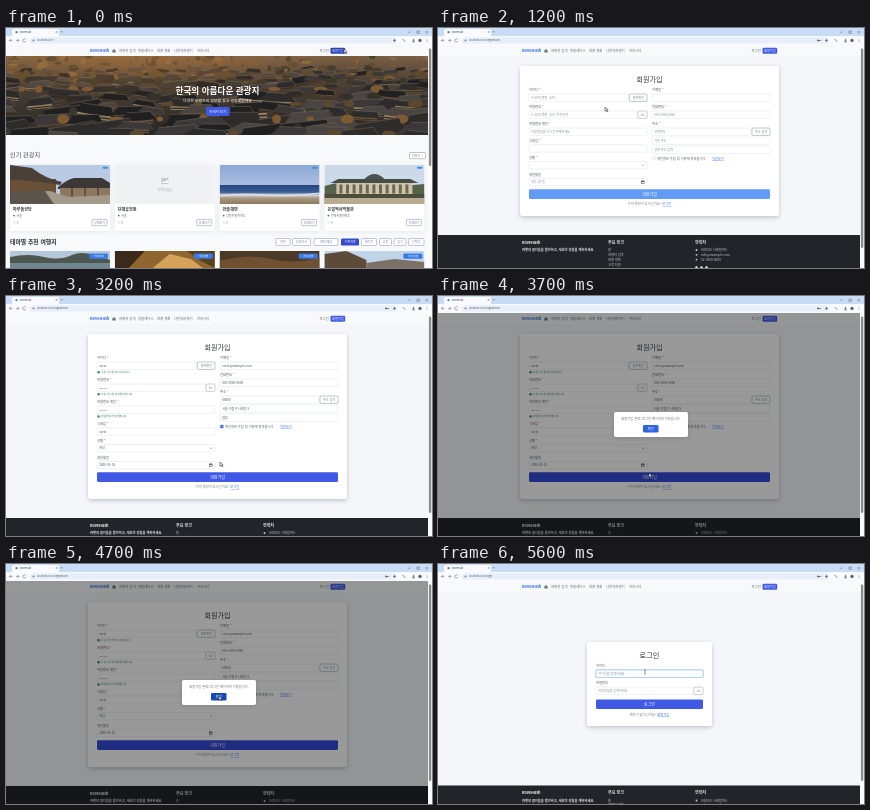
An HTML page that plays this animation: 426 px wide and 240 px high, repeating every 5.7 s.

```html
<!DOCTYPE html>
<html lang="ko">
<head>
<meta charset="utf-8">
<title>RoveHush</title>
<style>
html, body { margin: 0; width: 100%; height: 100%; overflow: hidden; background: #f4f6f9; }
svg { display: block; width: 100%; height: 100%; }
text { font-family: "Noto Sans CJK KR", "Noto Sans CJK", "Noto Sans", sans-serif; white-space: pre; }
</style>
</head>
<body>
<svg id="stage" viewBox="0 0 426 240"></svg>
<script>
const LOOP = 5700, STEP = 100;
const OPEN_REGISTER = 400, CHECK_ID = 1900, FILL_REST = 2000, AGREE = 3000;
const OPEN_MODAL = 3700, OPEN_LOGIN = 4800, FOCUS_LOGIN = 5500;
const BLUE = '#4059e5', LINK = '#3f74ea', INK = '#2c3036', MUTED = '#82878d', LINE = '#dfe3e7';
const stage = document.getElementById('stage');

const rect = (x, y, w, h, fill, extra = '') =>
  `<rect x="${x}" y="${y}" width="${w}" height="${h}" fill="${fill}" ${extra}/>`;
const path = (d, fill, extra = '') => `<path d="${d}" fill="${fill}" ${extra}/>`;
const stroke = (d, color, width = .6) => path(d, 'none', `stroke="${color}" stroke-width="${width}"`);
const dot = (x, y, r, fill) => `<circle cx="${x}" cy="${y}" r="${r}" fill="${fill}"/>`;
// y is the vertical middle of the line of text
const text = (x, y, str, size, fill = INK, extra = '') =>
  `<text x="${x}" y="${y + size * .36}" font-size="${size}" fill="${fill}" ${extra}>${str}</text>`;
const middle = (x, y, str, size, fill, bold) =>
  text(x, y, str, size, fill, `text-anchor="middle" font-weight="${bold ? 700 : 400}"`);
const bold = (x, y, str, size, fill) => text(x, y, str, size, fill, 'font-weight="700"');

function random(seed) {
  return () => (seed = seed * 16807 % 2147483647) / 2147483647;
}

function button(x, y, w, h, label, size, fill = BLUE, color = '#fff') {
  return rect(x, y, w, h, fill, 'rx="1.3"') + middle(x + w / 2, y + h / 2, label, size, color);
}

function outlined(x, y, w, h, label, size = 3, color = '#777d84') {
  return rect(x, y, w, h, '#fff', `rx="1" stroke="${color}" stroke-width=".45"`) +
    middle(x + w / 2, y + h / 2, label, size, color);
}

function card(x, y, w, h) {
  return rect(x, y + 1.5, w, h, '#9ba5b0', 'rx="3" filter="url(#blur)" opacity=".65"') +
    rect(x, y, w, h, '#fff', 'rx="2.5"');
}

function field(x, y, w, value, hint = '', focus = false, h = 7.4) {
  const ring = focus ? rect(x - .7, y - .7, w + 1.4, h + 1.4, '#c6dcfd', 'rx="1.6"') : '';
  return ring + rect(x, y, w, h, '#fff', `rx="1" stroke="${focus ? '#78aef8' : LINE}" stroke-width=".5"`) +
    text(x + 2.2, y + h / 2, value || hint, 3.1, value ? '#4b5157' : '#888d93');
}

const label = (x, y, str, required = true) =>
  text(x, y, str + (required ? ' <tspan fill="#dc3545">*</tspan>' : ''), 3.3, '#50555b');

const eye = (x, y) => rect(x, y, 9, 7.4, '#fff', 'rx="1" stroke="#92979c" stroke-width=".45"') +
  `<ellipse cx="${x + 4.5}" cy="${y + 3.7}" rx="1.5" ry=".9" fill="none" stroke="#777" stroke-width=".4"/>`;

const defs = `<defs>
  <filter id="blur" x="-10%" y="-10%" width="120%" height="125%"><feGaussianBlur stdDeviation="2"/></filter>
  <linearGradient id="town" x2="0" y2="1"><stop stop-color="#8f7050"/><stop offset=".3" stop-color="#5e4e3f"/>
    <stop offset="1" stop-color="#2f2d2c"/></linearGradient>
  <radialGradient id="sun" cx=".3" cy="0" r=".5"><stop stop-color="#d08a45" stop-opacity=".55"/>
    <stop offset="1" stop-color="#d08a45" stop-opacity="0"/></radialGradient>
  <linearGradient id="sea" x2="0" y2="1"><stop stop-color="#8ea9d6"/><stop offset=".5" stop-color="#a9bce0"/>
    <stop offset=".52" stop-color="#244682"/><stop offset=".7" stop-color="#3c5f96"/>
    <stop offset=".77" stop-color="#d5d9df"/><stop offset=".85" stop-color="#a8977f"/>
    <stop offset="1" stop-color="#8f7a62"/></linearGradient>
</defs>`;

function browser(page) {
  const route = { home: '', register: '/registeruser', login: '/login' }[page];
  let s = rect(0, 0, 426, 9, '#c9dcf5') + rect(0, 8, 426, 9, '#f8faff') +
    path('M6 8V2.5Q6 1 8 1H51Q53 1 53 2.5V8Z', '#f8faff') + dot(10.5, 4.2, 1.1, '#3974db') +
    text(14, 4.2, 'RoveHush', 2.4, '#333') + text(49, 4.2, '×', 3.2) + text(55, 4.2, '+', 3.5) +
    rect(24, 9.2, 367, 6.4, '#e9eff8', 'rx="3.2"') + dot(27.5, 12.4, .9, '#777') +
    text(31, 12.4, 'localhost:5173' + route, 2.45, '#454b54');
  s += stroke('M6.5 12.4H3.5l1.4-1.4M3.5 12.4l1.4 1.4M10 12.4h3l-1.4-1.4M13 12.4l-1.4 1.4M19.8 11.4a1.6 1.6 0 1 0 .1 1.8', '#555', .5);
  s += stroke('M402 4.2h2.5M411 3h2.4v2.4H411ZM419.5 3l2.4 2.4M421.9 3l-2.4 2.4', '#384454', .4);
  s += stroke('M387 12.4h3M388.5 11v3M396.5 11l2.8 2.8M406 13.8h3M407.5 10.7v2.3l-1-.8M407.5 13l1-.8', '#444', .6);
  s += dot(414, 12.4, 1.7, '#59626c') + [11, 12.4, 13.8].map(y => dot(421, y, .35, '#444')).join('');
  if (page !== 'home') s += dot(380, 12.4, .9, '#555') + rect(380, 12, 3, .7, '#555');
  return s;
}

function nav(hover) {
  const items = [[113, '여행지 검색'], [132, '핫플레이스'], [151, '여행 계획'], [168, '나만의여행기'], [191, '커뮤니티']];
  return rect(0, 17, 422, 11, '#f8f9fa') + bold(84, 22.7, 'RoveHush', 3.9, '#2f6ce0') +
    path('M106.3 22.5l1.7-1.6 1.7 1.6v2h-3.4Z', '#777') +
    items.map(([x, s]) => text(x, 22.7, s, 3.4, '#6b7075')).join('') +
    text(313.5, 22.7, '로그인', 3.4, '#6b7075') +
    button(324.5, 19.8, 14.7, 6, '회원가입', 3.2, hover ? '#263fb8' : BLUE);
}

const scrollbar = end => rect(422, 17, 4, 223, '#fbfbfb') +
  rect(422.9, 20.5, 2.4, end - 20.5, '#8b8b8b', 'rx="1.2"');

function footer(y) {
  const links = ['홈', '여행지 검색', '여행 계획', '고객 지원'];
  const contacts = ['(00000) 나래캠퍼스', 'info@example.com', '02-0000-0000'];
  return rect(0, y, 422, 240 - y, '#212529') + bold(84, y + 7.5, 'RoveHush', 3.7, '#fff') +
    bold(84, y + 15, '여행의 즐거움을 발견하고, 새로운 경험을 계획하세요.', 3.25, '#e8e9eb') +
    bold(170, y + 7.5, '주요 링크', 4, '#e8e9eb') + bold(257, y + 7.5, '연락처', 4, '#e8e9eb') +
    links.map((s, i) => text(170, y + 15 + i * 4.8, s, 3.2, '#c2c5c8')).join('') +
    contacts.map((s, i) => dot(258.5, y + 15 + i * 4.8, .9, '#cfd1d4') +
      text(263, y + 15 + i * 4.8, s, 3.2, '#c2c5c8')).join('') +
    [258.5, 263.5, 268.5].map(x => dot(x, y + 32.5, 1.3, '#e5e6e8')).join('');
}

// A tiled roof with upturned eaves above a plaster wall, slightly turned.
function house(x, y, w, r) {
  const h = w * (.16 + r() * .1), ridge = .15 + r() * .2;
  const tile = ['#262626', '#353433', '#454240', '#57514b'][Math.floor(r() * 4)];
  const wall = ['#4b3a2c', '#7d6549', '#a89273', '#5d4b3a'][Math.floor(r() * 4)];
  const left = x + w * ridge, right = x + w * (1 - ridge * .6), eave = y + h;
  return `<g transform="rotate(${(r() - .5) * 22} ${x + w / 2} ${y})">` +
    rect(x + w * .1, eave - 1, w * .8, h * .7, wall) +
    stroke(`M${x + w * .1} ${eave + h * .35}h${w * .8}`, '#3a2f27', h * .15) +
    path(`M${x} ${eave}Q${x + w * .15} ${y + h * .75} ${left} ${y}H${right}Q${x + w * .9} ${y + h * .75} ${x + w} ${eave}Q${x + w / 2} ${eave + h * .2} ${x} ${eave}Z`, tile) +
    stroke(`M${left} ${y}H${right}L${x + w} ${eave}`, '#85796b', .5) + '</g>';
}

function town() {
  const r = random(73);
  const trees = ['#6b5535', '#45422f', '#94683a', '#3c3a30', '#a87f4e'];
  let s = rect(0, 28, 422, 79, 'url(#town)');
  for (let i = 0; i < 160; i++) {
    s += `<ellipse cx="${r() * 422}" cy="${28 + r() * 26}" rx="${1 + r() * 5}" ry="${1 + r() * 2.5}" fill="${trees[i % 5]}" opacity=".8"/>`;
  }
  for (let row = 0; row < 9; row++) {
    const size = 14 + row * 6;
    for (let x = -r() * size; x < 422; x += size * (.5 + r() * .6)) {
      s += house(x, 38 + row * 7.5 + r() * 7, size * (.6 + r() * .7), r);
      if (r() > .6) s += `<ellipse cx="${x}" cy="${46 + row * 7.5}" rx="${3 + r() * 5}" ry="${2 + r() * 3}" fill="${trees[row % 4]}"/>`;
    }
  }
  return `<svg x="0" y="28" width="422" height="79" viewBox="0 28 422 79">${s}` +
    rect(0, 28, 422, 79, 'url(#sun)') + rect(0, 28, 422, 79, '#000', 'opacity=".15"') + '</svg>';
}

const sky = color => rect(0, 0, 100, 39, color);
const pictures = [
  sky('#b9cbe4') + path('M0 14H46V30H0Z', '#6b5038') + path('M0 0L22 3Q36 14 52 17L50 20Q20 15 0 15Z', '#4a4038') +
    path('M48 22Q58 14 64 13H92L100 18V24H48Z', '#3c3835') + rect(50, 23, 50, 9, '#8d7760') + stroke('M62 23v9M75 23v9M88 23v9', '#463a30', 1.2) +
    path('M0 28L40 26 58 32 100 30V39H0Z', '#a39a8c') + path('M0 27L34 25 44 39H0Z', '#5a544c'),
  sky('#eff1f3') + rect(46.5, 13, 7, 6, '#c5c9ce') + path('M47 18l2-2 1.5 1 2-2.5 1 3.5Z', '#fff') +
    middle(50, 25, '이미지 없음', 3, '#a1a6ab'),
  sky('url(#sea)') + stroke('M0 31Q20 28 45 30T100 28', '#e6e9ed', 1),
  sky('#ccd9e8') + path('M0 21Q25 14 49 18T100 19V39H0Z', '#56624a') + rect(12, 18, 76, 12, '#cfc4a9') +
    path('M6 18L14 14H86L94 18Z', '#464d46') + path('M40 14Q50 4 60 14Z', '#4b5650') +
    Array.from({ length: 11 }, (_, i) => rect(15 + i * 6.6, 19.5, 3, 9, '#6f6756')).join('') +
    rect(0, 29, 100, 4, '#4d4d3d') + rect(0, 33, 100, 6, '#b9ab91'),
];
const themes = [
  sky('#b5c7da') + path('M0 6Q18 2 34 6T62 4T100 9V17H0Z', '#4d5750') + path('M0 12H100V17H0Z', '#6f8791'),
  sky('#8f6630') + path('M0 0H30L14 17H0Z', '#3b2a1c') + path('M38 17L55 3 76 8 88 17Z', '#d5a45a') + path('M72 0H100V17L86 10Z', '#59401f'),
  sky('#4b3927') + path('M0 10Q30 2 52 8T100 6V17H0Z', '#6f5132'),
  sky('#c0d3e8') + path('M0 3L22 0 42 9V17H0Z', '#5d4a38') + path('M42 12L70 8 100 11V17H42Z', '#7b7265'),
];
const place = (picture, x, y, h = 39) => `<svg x="${x}" y="${y}" width="100" height="${h}" viewBox="0 0 100 ${h}">${picture}</svg>`;

function buildHome() {
  const names = ['마루돌성당', '단해휴양원', '안솔해변', '온결역사박물관'];
  const towns = ['서울', '서울', '강원특별자치도', '전북특별자치도'];
  const chips = [[270, 14, '자연'], [286.5, 18, '문화역사'], [308, 24, '레저/체험'], [335, 18, '가족여행'],
    [355.5, 15, '데이트'], [373.5, 12, '쇼핑'], [388, 12, '음식'], [402.5, 15.5, '산책길']];
  let s = rect(0, 17, 422, 223, '#f8f9fa') + town() +
    middle(211.5, 63, '한국의 아름다운 관광지', 8.6, '#fff', true) +
    middle(211.5, 72.4, '다양한 여행지의 정보를 찾고 경험해보세요', 3.9, '#fff') +
    button(200, 79, 23.5, 9, '자세히 보기', 3.5) +
    text(4, 127, '인기 관광지', 6.2, '#4b5056') + outlined(403.5, 124.5, 16, 6.2, '더보기 +');
  names.forEach((name, i) => {
    const x = 4 + i * 104.8;
    s += rect(x, 137.7, 100, 66, '#a8b0b9', 'rx="2" filter="url(#blur)" opacity=".25"') + rect(x, 137, 100, 66, '#fff', 'rx="1.5"') +
      place(pictures[i], x, 137) + (i === 1 ? '' : rect(x + 92.5, 138.7, 5.5, 2, '#3a8ee0', 'rx="1"')) +
      bold(x + 3, 182, name, 4.1) + dot(x + 4, 187.6, .9, '#666') + text(x + 6.5, 187.6, towns[i], 3, '#666') +
      text(x + 3, 194.6, '♡ 0', 3, MUTED) + outlined(x + 82, 191.4, 15, 6.3, '상세보기', 3, '#737b98') +
      place(themes[i], x, 223, 17) + button(x + 79, 225.4, 19, 5.4, '가족여행', 2.8, '#3879e9');
  });
  s += bold(4, 213.5, '테마별 추천 여행지', 5.9);
  chips.forEach(([x, w, name], i) => {
    s += i === 3 ? button(x, 210.5, w, 7, name, 3, '#3449cf') : outlined(x, 210.5, w, 7, name, 3, '#7482b0');
  });
  return s + scrollbar(138);
}
const home = buildHome();

const valid = (y, str) => dot(92.6, y, 1.3, '#278557') + stroke(`M91.9 ${y}l.5.5 1-1`, '#fff', .35) + text(95, y, str, 2.7, '#427a5c');

function register(t) {
  const id = 'sorin'.slice(0, Math.max(0, Math.floor((t - 1200) / 100)));
  const checked = t >= CHECK_ID, filled = t >= FILL_REST, agreed = t >= AGREE;
  const a = checked ? 5 : 0, b = filled ? 10 : a, c = filled ? 15 : a;
  const pick = value => filled ? value : '';
  const detail = filled && t < 2500;
  return rect(0, 17, 422, 223, '#f4f6f9') + card(82, 38, 259, 150 + c) + middle(211.5, 51, '회원가입', 7) +
    label(91, 62, '아이디') + field(91, 66, 99, id, '4~20자 영문, 숫자', t >= 1300 && t < CHECK_ID) + outlined(191.3, 66, 17.7, 7.4, '중복확인') +
    (checked ? valid(76.2, '사용 가능한 아이디입니다.') : '') +
    label(91, 79 + a, '비밀번호') + field(91, 83 + a, 109, checked ? '••••••••' : '', '8~20자 영문, 숫자, 특수문자') + eye(200, 83 + a) +
    (filled ? valid(98.2, '사용 가능한 비밀번호입니다.') : '') +
    label(91, 96 + b, '비밀번호 확인') + field(91, 100 + b, 118, pick('••••••••'), '비밀번호를 다시 입력해주세요') +
    (filled ? valid(120.5, '비밀번호가 일치합니다.') : '') +
    label(91, 113 + c, '닉네임') + field(91, 116.8 + c, 118, pick('sorin')) +
    label(91, 129.6 + c, '성별') + field(91, 133.5 + c, 118, pick('여성')) + stroke(`M204 ${136.7 + c}l1.1 1.1 1.1-1.1`, '#555', .5) +
    label(91, 146.6 + c, '생년월일', false) + field(91, 150.5 + c, 118, pick('2000-01-01'), '연도-월-일') +
    rect(203.5, 153 + c, 2.6, 2.4, 'none', 'stroke="#333" stroke-width=".5"') + rect(203.5, 152.8 + c, 2.6, .8, '#333') +
    label(214, 62, '이메일') + field(214, 66, 118, pick('sorin@example.com')) +
    label(214, 79, '전화번호') + field(214, 83, 118, pick('010-0000-0000'), '010-0000-0000') +
    label(214, 96, '주소') + field(214, 100, 99, pick('00000'), '우편번호') + outlined(314, 100, 18, 7.4, '주소 검색') +
    field(214, 109, 118, pick('서울 가람구 나래길 5'), '기본 주소') + field(214, 118, 118, pick('없음'), '상세 주소 입력', detail) +
    rect(214.3, 129, 3, 3, agreed ? '#2f6ce5' : '#fff', `rx=".6" stroke="${agreed ? '#2f6ce5' : '#c0c5ca'}" stroke-width=".4"`) +
    (agreed ? stroke('M215 130.5l.6.6 1.1-1.3', '#fff', .5) : '') +
    text(219, 130.5, '개인정보 수집 및 이용에 동의합니다.', 3.25, '#555b61') + text(274, 130.5, '약관보기', 3.2, LINK, 'text-decoration="underline"') +
    button(91, 161.3 + c, 241, 9.6, '회원가입', 4, !agreed ? '#629bf5' : t >= 3500 ? '#344bd4' : BLUE) +
    middle(211.5, 176 + c, `이미 계정이 있으신가요? <tspan fill="${LINK}" text-decoration="underline">로그인</tspan>`, 3.3, '#73787e') +
    footer(207 + c) + scrollbar(c ? 217 : 220);
}

function modal(t) {
  return rect(0, 17, 422, 223, '#000', 'opacity=".4"') + rect(176, 117, 74, 25, '#333', 'rx="2" filter="url(#blur)" opacity=".2"') +
    rect(176, 116, 74, 25, '#fff', 'rx="1.8"') +
    middle(213, 122.8, '회원가입 완료! 로그인 페이지로 이동합니다.', 3.25, '#6b7076') +
    button(205, 129, 15.5, 7.6, '확인', 3.3, t >= 4400 ? '#174ab9' : '#3064df');
}

function login(t) {
  return rect(0, 17, 422, 223, '#f4f6f9') + card(149, 78, 125, 84) + middle(211.5, 91, '로그인', 7.2) +
    label(158, 102, '아이디', false) + field(158, 106, 107, '', '아이디를 입력하세요', t >= FOCUS_LOGIN) +
    label(158, 119, '비밀번호', false) + field(158, 123.2, 98, '', '비밀번호를 입력하세요') + eye(256, 123.2) +
    button(158, 135.5, 107, 9.5, '로그인', 4) +
    middle(211.5, 150.5, `계정이 없으신가요? <tspan fill="${LINK}" text-decoration="underline">회원가입</tspan>`, 3.3, '#73787e') +
    footer(221.5) + scrollbar(217);
}

const route = [
  [0, 338, 21], [400, 338, 21], [900, 174, 78], [1200, 167, 79], [1500, 145, 70], [1900, 190, 89], [2100, 244, 121],
  [2500, 244, 121], [2900, 216, 130], [3000, 216, 130], [3200, 214, 166], [3500, 211, 177], [3900, 211, 177],
  [4400, 213, 132], [4800, 213, 132], [5300, 207, 108], [5700, 207, 108],
];

function pointer(t) {
  const i = route.findIndex(point => point[0] > t);
  const [t0, x0, y0] = route[i - 1], [t1, x1, y1] = route[i];
  const u = (t - t0) / (t1 - t0), k = u * u * (3 - 2 * u);
  const x = x0 + (x1 - x0) * k, y = y0 + (y1 - y0) * k;
  if ((t >= 1400 && t < 2600) || t >= 5300) {
    return stroke(`M${x - .8} ${y - 2}h1.6M${x} ${y - 2}v4M${x - .8} ${y + 2}h1.6`, '#333', .5);
  }
  return path(`M${x} ${y}v4.2l1-1 .8 1.7.8-.4-.8-1.6h1.4Z`, '#fff', 'stroke="#111" stroke-width=".5"');
}

let shown = -1;
function update(now) {
  const t = Math.floor(now % LOOP / STEP) * STEP;
  if (t !== shown) {
    shown = t;
    const page = t < OPEN_REGISTER ? 'home' : t < OPEN_LOGIN ? 'register' : 'login';
    const body = page === 'home' ? home : page === 'register' ? register(t) : login(t);
    stage.innerHTML = defs + body + nav(page === 'home') + browser(page) +
      (t >= OPEN_MODAL && t < OPEN_LOGIN ? modal(t) : '') + pointer(t);
  }
}

const start = performance.now();
function frame() {
  update(performance.now() - start);
  requestAnimationFrame(frame);
}
frame();
</script>
</body>
</html>
```
